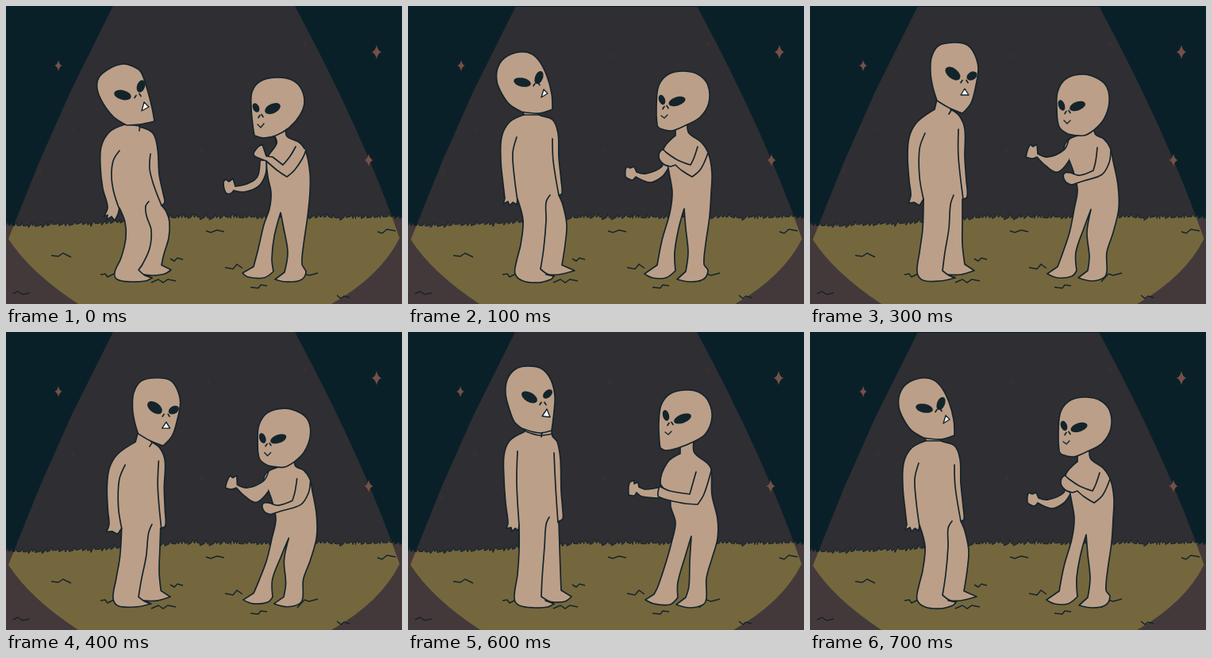
Write an HTML page with a canvas that moves like this. It is 499 px wide and 375 px high and loops after 800 ms.

```html
<!DOCTYPE html>
<html>
<head>
<meta charset="utf-8">
<title>Dancing aliens</title>
<style>
html, body { margin: 0; overflow: hidden; background: #0a2029; }
canvas { display: block; }
</style>
</head>
<body>
<canvas width="499" height="375"></canvas>
<script>
const ctx = document.querySelector('canvas').getContext('2d');
const INK = '#14242b', SKIN = '#bc9f88';

// Smooth curve through "x,y" points; a trailing "!" marks a sharp corner.
function curve(text, closed) {
  const pts = text.split(' ').map(s => {
    const [x, y] = s.split(',').map(parseFloat);
    return { x, y, sharp: s.endsWith('!') };
  });
  const n = pts.length;
  pts.forEach((p, i) => {
    const a = pts[(i + n - 1) % n], b = pts[(i + 1) % n];
    const len = Math.hypot(b.x - a.x, b.y - a.y) || 1;
    const flat = p.sharp || (!closed && (i === 0 || i === n - 1));
    p.dx = flat ? 0 : (b.x - a.x) / len / 3;
    p.dy = flat ? 0 : (b.y - a.y) / len / 3;
  });
  const path = new Path2D();
  path.moveTo(pts[0].x, pts[0].y);
  for (let i = 1; i < n + (closed ? 1 : 0); i++) {
    const p = pts[i - 1], q = pts[i % n], d = Math.hypot(q.x - p.x, q.y - p.y);
    path.bezierCurveTo(p.x + p.dx * d, p.y + p.dy * d, q.x - q.dx * d, q.y - q.dy * d, q.x, q.y);
  }
  return path;
}

function shape(text, closed) {
  const path = curve(text, closed);
  ctx.fillStyle = SKIN;
  ctx.fill(path);
  ctx.stroke(path);
}

// eyes: [x, y, rx, ry, degrees]; nose: nostril positions
function alien({ body, arms = [], lines, head, eyes, nose, mouth, teeth }) {
  ctx.strokeStyle = INK;
  ctx.lineWidth = 1.7;
  ctx.lineJoin = ctx.lineCap = 'round';
  shape(body);
  lines.forEach(l => ctx.stroke(curve(l)));
  arms.forEach(a => shape(a));
  shape(head, true);
  ctx.fillStyle = INK;
  for (const [x, y, rx, ry, deg] of eyes) {
    ctx.beginPath();
    ctx.ellipse(x, y, rx, ry, deg * Math.PI / 180, 0, 7);
    ctx.fill();
  }
  ctx.beginPath();
  nose.forEach(([x, y], i) => {
    const s = i ? 1 : -1;
    ctx.moveTo(x - s, y - 1.5);
    ctx.lineTo(x + s, y + 1.5);
  });
  ctx.stroke();
  ctx.lineWidth = 1.4;
  const lips = curve(mouth, teeth);
  if (teeth) { ctx.fillStyle = '#fff'; ctx.fill(lips); }
  ctx.stroke(lips);
}

const tall = o => ({ ...o, teeth: true });

const low = [tall({
  body: '150,149 131,158 120,177 119,203 122,230 128,253 123,265! 128,263! 127,269! 133,265! 137,270! 141,262 143,254! 150,272 151,292 145,317 137,335 140,344 158,347 176,346 184,342! 174,338! 186,339 200,337 208,332! 196,326! 199,312 205,292 206,272 202,259 196,251! 200,247 198,236 193,212 191,180 185,160 168,152',
  lines: ['143,182 135,195 133,215 136,235 143,256', '182,186 181,205 186,225 196,251', '180,246 176,252 177,264 183,282 181,305 172,325 167,332! 175,339 184,342', '169,149 168,157'],
  head: '147,73 130,79 117,90 115,105 122,122 135,139 152,150! 168,149 187,145! 184,128 178,105 170,83 160,76',
  eyes: [[147, 112, 11, 6, 14], [170, 101, 5, 8, 20]], nose: [[163, 114], [169, 112]],
  mouth: '174,121! 171,132! 180,127!'
}), {
  body: '338,163 341,173 329,192 330,215 334,235 332,255 325,275 318,305 312,328! 298,336! 305,341 325,342 337,334! 335,318 338,290 346,260! 350,280 355,310 351,335! 339,344! 352,347 371,345 378,335 373,325 375,300 380,265 383,235 383,210 378,184 370,172 354,164 353,154',
  lines: ['338,163 341,173'],
  arms: ['320,195 318,212 313,219 300,225 289,227! 286,217! 281,221! 277,218! 274,222 277,235 283,236 287,232! 300,234 318,227 327,212 328,195',
    '365,177 358,189 349,200! 336,190! 328,189! 323,174! 317,178 312,187 320,192 328,195! 342,207 354,215! 364,206 374,191 378,181'],
  head: '340,90 320,95 310,108 309,128 311,150 313,163! 325,166 340,163 357,153 370,138 376,122 372,104 360,93',
  eyes: [[315, 128, 4, 6, -25], [336, 129, 10.5, 6, -25]], nose: [[319, 139], [323, 138]],
  mouth: '317,149 321,153! 325,148'
}];

const back = [tall({
  body: '145,133 146,137! 128,146 118,165 117,195 120,225 122,242! 120,249! 126,246! 128,251! 132,247! 137,250! 138,243! 145,270 142,300 137,320 135,337 145,346 165,348 180,344 184,340! 174,338! 190,338 210,333! 194,326! 198,300 200,275 195,250 190,238! 194,236 193,220 190,190 189,160 182,143 165,137 165,133',
  lines: ['137,165 132,185 134,215 138,245', '182,167 183,195 190,238', '179,238 174,247 174,270 171,305 167,331! 175,337 184,340', '146,137 165,137'],
  head: '140,58 122,65 113,78 112,95 118,110 128,124 143,133! 165,135 182,130! 181,110 175,88 166,70 155,60',
  eyes: [[144, 96, 11, 5.5, 12], [165, 90, 5, 8.5, 22]], nose: [[159, 99], [165, 98]],
  mouth: '171,105! 168,115! 176,110!'
}), {
  body: '337,154 337,163! 322,180 327,200 330,215 333,235 330,260 320,295 314,326! 298,337! 308,342 325,342 337,333! 336,310 341,280 348,255! 350,280 353,310 350,334! 339,344! 355,347 372,344 378,333 373,325 375,300 380,265 382,235 383,210 379,187 370,172 354,160 352,150',
  lines: [],
  arms: ['318,193 320,202 300,211 288,209! 285,202! 280,204! 275,203 274,215! 282,219 287,215! 305,222 320,215 328,204',
    '365,177 360,192 356,200! 340,194 325,184! 320,181 316,190 322,199 331,202! 337,200! 345,207 358,215! 369,205 378,185'],
  head: '348,82 328,86 316,100 313,125 314,150 317,154! 332,157 350,150 368,140 379,122 378,100 367,87',
  eyes: [[320, 118, 4, 6.5, -20], [339, 120, 11, 5.5, -18]], nose: [[322, 128], [327, 127]],
  mouth: '319,138 323,141! 327,137'
}];

const high = [tall({
  body: '148,121 146,126! 128,137 121,155 121,185 123,215 126,240 124,247! 130,246! 131,251! 135,247! 139,250! 140,243! 140,275 138,305 134,335 140,344 160,347 176,346 184,342! 173,338! 185,340 198,339 206,333! 193,325! 192,300 191,270 190,238! 195,235 195,225 193,200 192,160 188,138 182,131 181,124',
  lines: ['138,150 137,190 140,243', '184,152 186,195 189,240', '178,233 174,242 172,270 169,310 168,333! 176,338 184,342', '146,124 165,130 182,128', '169,126 168,132'],
  head: '150,43 135,47 125,60 123,78 128,98 134,113 143,121! 165,127 181,124! 184,100 185,80 180,60 168,46',
  eyes: [[153, 82, 11, 6, 30], [176, 78, 7, 4.5, -42]], nose: [[167, 90], [173, 90]],
  mouth: '175,97! 169,106! 179,107!'
}), {
  body: '343,146 343,153! 327,164 318,190 330,205 331,220 337,240 332,265 325,290 315,320 310,330! 299,337! 310,342 330,343 340,334! 340,315 350,280 357,257! 355,290 354,320 350,334! 338,343! 355,347 372,343 376,335 376,310 383,285 390,260 390,235 383,205 382,173 377,165 361,152 360,138',
  lines: [],
  arms: ['319,195 300,198 291,195! 290,189! 285,191! 285,187! 279,190 278,205! 285,206 288,202! 295,207 318,209',
    '363,176 359,190 355,204! 330,200 317,194! 315,206 320,209 330,212! 350,216 365,217! 373,204 382,175'],
  head: '350,73 330,78 319,92 316,115 317,140 318,146! 325,149 340,146 360,138 375,128 383,108 379,88 367,76',
  eyes: [[325, 105, 4, 7, -15], [346, 109, 11.5, 5.5, -20]], nose: [[328, 116], [333, 115]],
  mouth: '324,126 328,129! 332,125'
}];

const front = [tall({
  body: '160,117 157,130! 135,146 125,165 123,190 125,220 127,238 124,248! 131,247! 138,251! 140,248! 143,243! 142,280 138,310 135,335 142,345 165,346 183,342! 174,338! 190,338 207,333! 195,325! 192,300 192,270 192,243! 198,240 197,220 195,190 195,155 188,138 177,130',
  lines: ['145,160 138,180 138,215 143,243', '187,155 187,190 193,243', '181,238 177,250 175,280 170,310 167,333! 175,339 183,342', '178,131 175,136'],
  head: '182,46 162,50 153,65 152,85 155,103 160,119! 175,128 192,135! 203,122 209,100 212,78 207,60 198,49',
  eyes: [[180, 85, 11, 6.5, 38], [204, 88, 7, 5, -32]], nose: [[191, 95], [198, 95]],
  mouth: '195,104! 190,112! 200,112!'
}), {
  body: '347,161 326,168 320,181 327,195 333,212 337,232 333,255 327,285 318,312 312,328! 299,337! 312,342 330,340 336,333! 335,310 345,280 354,256! 349,285 352,315 350,333! 338,342! 355,346 370,342 374,334 374,310 382,285 389,255 388,225 382,195 378,178 370,167 360,162 358,155',
  lines: [],
  arms: ['326,168 320,181 300,190 287,186! 286,174! 281,177! 277,175 272,190! 280,192 286,190! 297,201 312,209 326,195',
    '362,178 360,195 357,207! 340,213 329,210! 320,211 322,221 330,225! 345,220 368,212 377,197 379,182'],
  head: '343,86 322,92 312,108 311,130 314,152 325,161! 345,163 358,156! 370,143 377,122 374,102 362,91',
  eyes: [[317, 125, 4, 7, -20], [337, 126, 10.5, 5.5, -20]], nose: [[322, 134], [327, 133]],
  mouth: '320,144 324,148! 328,144'
}];

// The deepest forward bob leans and squashes the front pose.
const steps = [low, back, high, front, 'lean', front, high, back];

const beam = new Path2D('M135 0L82 106L42 196L3 293Q30 335 91 375H410Q472 340 496 292Q450 160 364 0Z');

function makeGrass() {
  let seed = 7;
  const rnd = () => (seed = seed * 16807 % 2147483647) / 2147483647;
  let d = 'M-5 380L-5 277';
  for (let x = 0; x < 505; x += 3 + rnd() * 6) {
    const base = x < 130 ? 277 - x * 0.03 : Math.max(266, 273 - (x - 130) * 0.095);
    d += `L${x} ${base + (rnd() - 0.5) * 2}l2 ${-1 - rnd() * 4}l1 4`;
  }
  return new Path2D(d + 'L505 380Z');
}
const grass = makeGrass();

function star(x, y, r, color) {
  const k = r * 0.16;
  ctx.fillStyle = color;
  ctx.fill(new Path2D(`M${x} ${y - r}Q${x + k} ${y - k} ${x + r * .7} ${y}Q${x + k} ${y + k} ${x} ${y + r}Q${x - k} ${y + k} ${x - r * .7} ${y}Q${x - k} ${y - k} ${x} ${y - r}`));
}

const tufts = ['57,314 66,315! 72,311! 82,316', '119,338 125,337! 128,341! 136,337', '252,283 258,285! 266,282! 275,284',
  '276,329 286,331! 291,325! 298,330', '308,354 318,355! 321,351! 329,352', '9,362 15,359! 21,363! 30,361',
  '183,348 192,344! 198,348! 204,344! 214,346', '207,318 212,321! 216,317! 223,319', '367,347 376,337! 382,339! 393,336',
  '417,364 422,368! 426,365! 433,367', '468,284 474,286! 480,281! 491,283'].map(t => curve(t));

function scene(shift) {
  ctx.fillStyle = '#0a2029';
  ctx.fillRect(0, 0, 499, 375);
  ctx.fillStyle = '#44393a';
  ctx.fill(grass);
  ctx.save();
  ctx.translate(shift / 2, shift);
  ctx.clip(beam);
  ctx.translate(0, -shift);
  ctx.fillStyle = '#2f2e33';
  ctx.fillRect(-2, -2, 505, 380);
  ctx.fillStyle = '#74673e';
  ctx.fill(grass);
  ctx.restore();
  ctx.strokeStyle = INK;
  ctx.lineWidth = 1;
  ctx.stroke(grass);
  ctx.lineWidth = 1.5;
  tufts.forEach(t => ctx.stroke(t));
  for (const [x, y, r] of [[66, 75, 7], [467, 58, 9], [457, 194, 8]]) star(x + shift, y, r, '#765047');
  for (const [x, y] of [[84, 154], [255, 63], [247, 183], [377, 48], [43, 208]]) star(x + shift, y, 6, '#382f33');
}

function draw(now) {
  const i = Math.floor(now % 800 / 100), pose = steps[i];
  scene(i % 2);
  ctx.save();
  if (pose === 'lean') ctx.transform(1, 0, -0.03, 0.96, 10, 13.6);
  (pose === 'lean' ? front : pose).forEach(alien);
  ctx.restore();
}

const start = performance.now();
function tick() {
  draw(performance.now() - start);
  requestAnimationFrame(tick);
}
tick();
</script>
</body>
</html>
```
